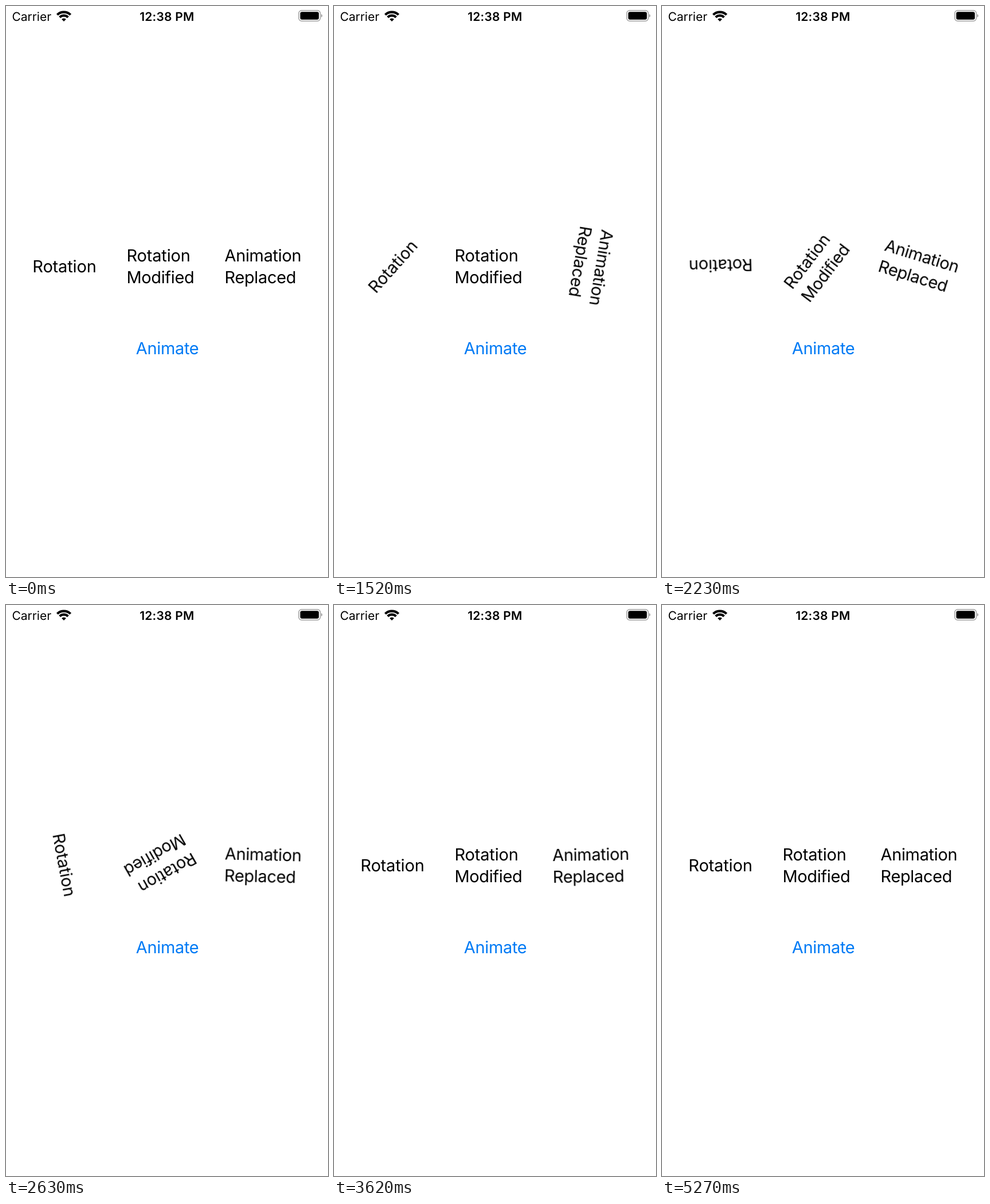
Write an HTML page that moves like this. It is 562 by 997 pixels and loops after 6430 ms.

```html
<!DOCTYPE html>
<html lang="en">
<head>
<meta charset="utf-8">
<title>Rotation animations</title>
<style>
  html, body { margin: 0; width: 100%; height: 100%; overflow: hidden; background: #fff; }
  svg { display: block; width: 100%; height: 100%; }
  text { font: 29px Inter, "Open Sans", sans-serif; letter-spacing: -.35px; text-rendering: geometricPrecision; }
  .loose { letter-spacing: -.15px; }
  .status { font-size: 21px; letter-spacing: 0; }
  .clock { font-weight: 600; letter-spacing: .2px; }
  .middle { text-anchor: middle; }

  .plain, .modified, .replaced, .button { animation: 6430ms linear infinite; }
  .plain { transform-origin: 102.3px 454px; animation-name: plain; }
  .modified { transform-origin: 269.6px 454px; animation-name: modified; }
  .replaced { transform-origin: 448.5px 454px; animation-name: spring; }
  .button { fill: #007af5; animation-name: press; }

  /* 910 ms to 2910 ms */
  @keyframes plain {
    0% { transform: rotate(0deg); }
    14.1524% { transform: rotate(0deg); animation-timing-function: ease-in; }
    45.2566%, 100% { transform: rotate(-360deg); }
  }
  /* same curve, delayed by 1 s at double speed */
  @keyframes modified {
    0% { transform: rotate(0deg); }
    29.7045% { transform: rotate(0deg); animation-timing-function: ease-in; }
    45.2566%, 100% { transform: rotate(-360deg); }
  }
  /* pressed at 800 ms, released at 910 ms */
  @keyframes press {
    0% { opacity: 1; animation-timing-function: step-end; }
    12.4417% { opacity: .2; }
    14.1524% { opacity: .2; animation-timing-function: ease-in-out; }
    20.3733%, 100% { opacity: 1; }
  }
</style>
</head>
<body>
<svg viewBox="0 0 562 997">
  <text class="status" x="10.4" y="25.6">Carrier</text>
  <g fill="none" stroke="#000" stroke-width="4.1">
    <path d="M89.4 15.4A16.4 16.4 0 0 1 112.6 15.4"/>
    <path d="M93.7 19.7A10.3 10.3 0 0 1 108.3 19.7"/>
    <path d="M97.1 23.1A5.5 5.5 0 0 1 104.9 23.1L101 27Z" fill="#000" stroke="none"/>
  </g>
  <text class="status clock middle" x="280.9" y="25.6">12:38 PM</text>
  <rect x="511" y="7.8" width="37.5" height="18.4" rx="5" fill="none" stroke="#a0a0a0" stroke-width="1.5"/>
  <rect x="513.5" y="10.2" width="32.5" height="13.6" rx="3"/>
  <path d="M550 14q2.2 .8 2.2 3t-2.2 3z" fill="#a0a0a0"/>

  <text class="plain loose" x="46.3" y="464.5">Rotation</text>
  <g class="modified">
    <text class="loose" x="210.4" y="445.5">Rotation</text>
    <text x="210.4" y="483.8">Modified</text>
  </g>
  <g class="replaced">
    <text x="381.5" y="445.5">Animation</text>
    <text x="381.5" y="483.8">Replaced</text>
  </g>
  <text class="button middle" x="281.6" y="607.5">Animate</text>
</svg>
<script>
  const LOOP = 6430, START = 914, END = 5300, STEP = 15;
  const RESPONSE = 0.6, DAMPING = 0.2;

  // Underdamped spring, settling from 0 to 1
  function spring(seconds) {
    const omega = 2 * Math.PI / RESPONSE;
    const decay = DAMPING * omega;
    const freq = omega * Math.sqrt(1 - DAMPING ** 2);
    const phase = freq * seconds;
    return 1 - Math.exp(-decay * seconds) * (Math.cos(phase) + decay / freq * Math.sin(phase));
  }

  const keyframe = (ms, angle) =>
    `${(ms / LOOP * 100).toFixed(4)}% { transform: rotate(${angle.toFixed(3)}deg); }`;

  const frames = [keyframe(0, 0)];
  for (let ms = START; ms < END; ms += STEP) {
    frames.push(keyframe(ms, -360 * spring((ms - START) / 1000)));
  }
  frames.push(keyframe(END, -360), keyframe(LOOP, -360));

  const style = document.createElement("style");
  style.textContent = `@keyframes spring { ${frames.join("\n")} }`;
  document.head.append(style);
</script>
</body>
</html>
```
